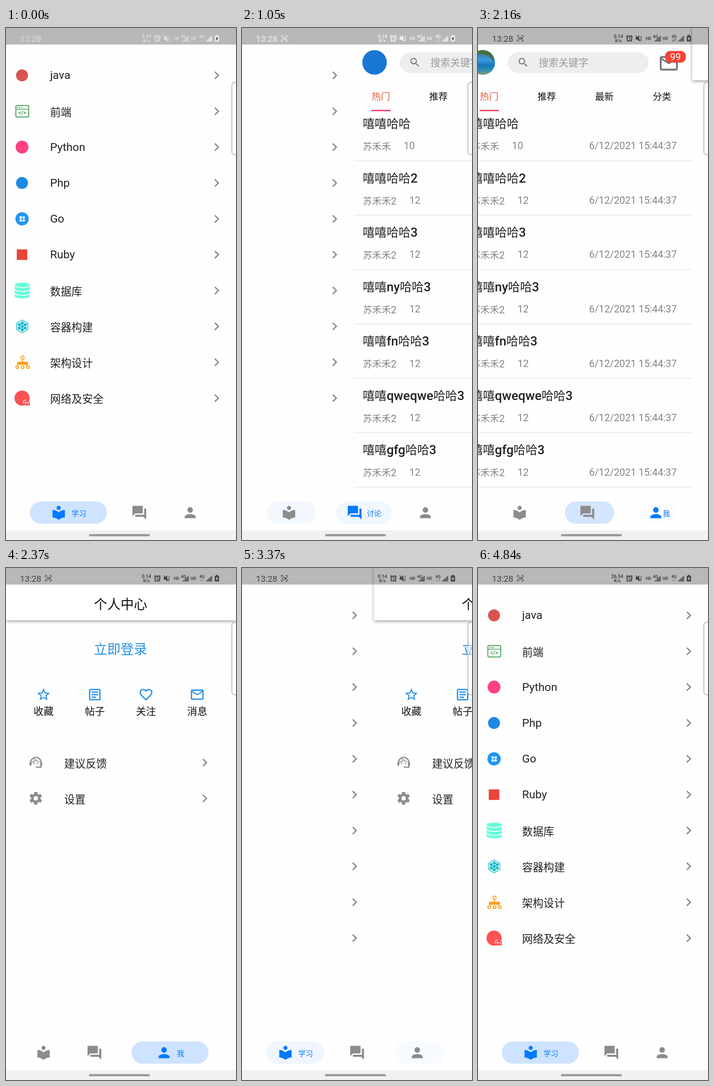
An HTML page with a canvas that plays this animation: 502 by 1116 pixels, repeating every 4.89 s.

```html
<!DOCTYPE html>
<html lang="zh-CN">
<head>
<meta charset="utf-8">
<style>
html, body { margin: 0; width: 100%; height: 100%; overflow: hidden; background: #fefefe; }
canvas { display: block; }
</style>
</head>
<body>
<canvas id="stage" width="502" height="1116"></canvas>
<script>
const W = 502, H = 1116, LOOP = 4890, SLIDE = 220;
const ctx = document.getElementById('stage').getContext('2d');
const GRAY = '#8c8c8c', BLUE = '#007aff', SKY = '#2590e6';
const LATIN = 'Roboto, "Noto Sans CJK SC", sans-serif';
const CJK = '"Noto Sans CJK SC", "Noto Sans CJK", sans-serif';

const icons = Object.fromEntries(Object.entries({
  chevron: 'M10 6L8.59 7.41 13.17 12l-4.58 4.59L10 18l6-6z',
  book: 'M12 11.55C9.64 9.35 6.48 8 3 8v11c3.48 0 6.64 1.35 9 3.55 2.36-2.19 5.52-3.55 9-3.55V8c-3.48 0-6.64 1.35-9 3.55zM12 8c1.66 0 3-1.34 3-3s-1.34-3-3-3-3 1.34-3 3 1.34 3 3 3z',
  chat: 'M21 6h-2v9H6v2c0 .55.45 1 1 1h11l4 4V7c0-.55-.45-1-1-1zm-4 6V3c0-.55-.45-1-1-1H3c-.55 0-1 .45-1 1v14l4-4h10c.55 0 1-.45 1-1z',
  person: 'M12 12c2.21 0 4-1.79 4-4s-1.79-4-4-4-4 1.79-4 4 1.79 4 4 4zm0 2c-2.67 0-8 1.34-8 4v2h16v-2c0-2.66-5.33-4-8-4z',
  search: 'M15.5 14h-.79l-.28-.27C15.41 12.59 16 11.11 16 9.5 16 5.91 13.09 3 9.5 3S3 5.91 3 9.5 5.91 16 9.5 16c1.61 0 3.09-.59 4.23-1.57l.27.28v.79l5 4.99L20.49 19l-4.99-5zm-6 0C7.01 14 5 11.99 5 9.5S7.01 5 9.5 5 14 7.01 14 9.5 11.99 14 9.5 14z',
  mail: 'M20 4H4c-1.1 0-1.99.9-1.99 2L2 18c0 1.1.9 2 2 2h16c1.1 0 2-.9 2-2V6c0-1.1-.9-2-2-2zm0 14H4V8l8 5 8-5v10zm-8-7L4 6h16l-8 5z',
  star: 'M22 9.24l-7.19-.62L12 2 9.19 8.63 2 9.24l5.46 4.73L5.82 21 12 17.27 18.18 21l-1.63-7.03L22 9.24zM12 15.4l-3.76 2.27 1-4.28-3.32-2.88 4.38-.38L12 6.1l1.71 4.04 4.38.38-3.32 2.88 1 4.28L12 15.4z',
  article: 'M19 5v14H5V5h14m0-2H5c-1.1 0-2 .9-2 2v14c0 1.1.9 2 2 2h14c1.1 0 2-.9 2-2V5c0-1.1-.9-2-2-2zM14 17H7v-2h7v2zm3-4H7v-2h10v2zm0-4H7V7h10v2z',
  heart: 'M16.5 3c-1.74 0-3.41.81-4.5 2.09C10.91 3.81 9.24 3 7.5 3 4.42 3 2 5.42 2 8.5c0 3.78 3.4 6.86 8.55 11.54L12 21.35l1.45-1.32C18.6 15.36 22 12.28 22 8.5 22 5.42 19.58 3 16.5 3zm-4.4 15.55l-.1.1-.1-.1C7.14 14.24 4 11.39 4 8.5 4 6.5 5.5 5 7.5 5c1.54 0 3.04.99 3.57 2.36h1.87C13.46 5.99 14.96 5 16.5 5c2 0 3.5 1.5 3.5 3.5 0 2.89-3.14 5.74-7.9 10.05z'
}).map(([name, d]) => [name, new Path2D(d)]));

// Moments at which another tab is chosen; dir is the side the new page enters from.
const switches = [
  { at: 985, from: 0, to: 1, dir: 1 },
  { at: 2143, from: 1, to: 2, dir: 1 },
  { at: 3298, from: 2, to: 0, dir: -1 }
];

const clamp = v => Math.max(0, Math.min(1, v));

function ease(x) {
  const bez = (s, a, b) => 3 * s * (1 - s) ** 2 * a + 3 * s * s * (1 - s) * b + s ** 3;
  let lo = 0, hi = 1;
  for (let i = 0; i < 20; i++) {
    const mid = (lo + hi) / 2;
    if (bez(mid, .25, .25) < x) lo = mid; else hi = mid;
  }
  return x >= 1 ? 1 : bez(lo, .1, 1);
}

function icon(name, x, y, size, color) {
  const k = size / 24;
  ctx.save();
  ctx.translate(x - size / 2, y - size / 2);
  ctx.scale(k, k);
  ctx.fillStyle = color;
  ctx.fill(icons[name]);
  ctx.restore();
}

// Chinese runs are set a little smaller than Latin ones.
function text(str, x, y, size, color, { weight = 400, center = false } = {}) {
  const runs = str.match(/[\u4e00-\u9fff]+|[^\u4e00-\u9fff]+/g).map(s => {
    const han = s.charCodeAt(0) > 0x4dff;
    const font = han ? `400 ${size * .945}px ${CJK}` : `${weight} ${size}px ${LATIN}`;
    ctx.font = font;
    return { s, font, w: ctx.measureText(s).width };
  });
  const width = runs.reduce((sum, r) => sum + r.w, 0);
  if (center) x -= width / 2;
  ctx.fillStyle = color;
  for (const r of runs) {
    ctx.font = r.font;
    ctx.fillText(r.s, x, y);
    x += r.w;
  }
  return width;
}

function rect(x, y, w, h, color, r = 0) {
  ctx.fillStyle = color;
  ctx.beginPath();
  ctx.roundRect(x, y, w, h, r);
  ctx.fill();
}

function disc(x, y, r, color) {
  ctx.fillStyle = color;
  ctx.beginPath();
  ctx.arc(x, y, r, 0, 7);
  ctx.fill();
}

function stroke(d, color, width) {
  ctx.strokeStyle = color;
  ctx.lineWidth = width;
  ctx.stroke(new Path2D(d));
}

function ring(x, y, r, color, width) {
  ctx.strokeStyle = color;
  ctx.lineWidth = width;
  ctx.beginPath();
  ctx.arc(x, y, r, 0, 7);
  ctx.stroke();
}

function hexagon(x, y, r) {
  ctx.beginPath();
  for (let i = 0; i < 6; i++) {
    const a = (i + .5) * Math.PI / 3;
    ctx.lineTo(x + r * Math.cos(a), y + r * Math.sin(a));
  }
  ctx.closePath();
}

// Each subject icon is drawn around the origin.
const subjects = [
  ['java', () => disc(0, 0, 13, '#d9534f')],
  ['前端', () => {
    const green = '#43a057';
    ctx.strokeStyle = green;
    ctx.lineWidth = 2;
    ctx.beginPath();
    ctx.roundRect(-13.5, -12.5, 28, 25, 3);
    ctx.stroke();
    stroke('M-13.5 -4.5H14.5', green, 1.5);
    for (const x of [-9, -5, -1]) disc(x, -8.3, 1.2, green);
    text('</>', .5, 8, 12, green, { weight: 700, center: true });
  }],
  ['Python', () => disc(0, 0, 14, '#ff4081')],
  ['Php', () => disc(0, 0, 13, '#1e88e5')],
  ['Go', () => {
    disc(0, 0, 14.5, '#2196f3');
    for (const [x, y] of [[-5.5, -5.5], [1, -5.5], [-5.5, 1]]) rect(x, y, 5, 5, '#fff', 1);
    stroke('M3.5 .5V6.5M.5 3.5H6.5', '#fff', 2.6);
  }],
  ['Ruby', () => rect(-11.5, -11.5, 23, 23, '#e8443a')],
  ['数据库', () => {
    rect(-16, -17, 33, 34, '#64ffda', { x: 16.5, y: 4.5 });
    for (const y of [-10, -1.5, 7]) stroke(`M-17 ${y}Q.5 ${y + 8} 18 ${y}`, '#fff', 2);
  }],
  ['容器构建', () => {
    const cyan = '#17bccb';
    ctx.strokeStyle = cyan;
    ctx.lineWidth = 1.6;
    hexagon(.5, 0, 14);
    ctx.stroke();
    ctx.fillStyle = cyan;
    for (let i = 0; i < 7; i++) {
      const a = (i + .5) * Math.PI / 3, r = i < 6 ? 7.4 : 0;
      hexagon(.5 + r * Math.cos(a), r * Math.sin(a), 3.8);
      ctx.fill();
    }
  }],
  ['架构设计', () => {
    const orange = '#ff9f1a';
    ring(1, -10, 3.6, orange, 2);
    stroke('M1 -6V0M-9 2V8M11 2V8', orange, 2);
    rect(-11, -1, 24, 6.5, orange, 1);
    for (const x of [-10.5, 1, 12.5]) ring(x, 10.8, 3, orange, 2);
  }],
  ['网络及安全', () => {
    disc(0, 0, 16.5, '#ff5252');
    rect(6, 7, 11, 9, '#ff5252');
    stroke('M3 12V7Q6 4 9 4M8 8V13M5 10H12M13 8L15 13', '#fff', 1.3);
  }]
];

function studyPage() {
  subjects.forEach(([name, draw], i) => {
    const y = 103.3 + 78.15 * i;
    ctx.save();
    ctx.translate(35, y);
    draw();
    ctx.restore();
    text(name, 96.2, y + (name < '\u4e00' ? 8 : 10.8), 24.7, '#222');
    icon('chevron', 459.8, y, 35, GRAY);
  });
}

function avatar(loaded) {
  disc(45, 75, 26.7, '#1976d2');
  if (!loaded) return;
  ctx.save();
  ctx.beginPath();
  ctx.arc(45, 75, 26.7, 0, 7);
  ctx.clip();
  const g = ctx.createLinearGradient(0, 48, 0, 102);
  [[0, '#34698c'], [.4, '#3c9be0'], [.6, '#1777bd'], [.82, '#2f8fae'], [1, '#8f9a78']]
    .forEach(([at, c]) => g.addColorStop(at, c));
  rect(18, 48, 54, 54, g);
  ctx.fillStyle = '#47703a';
  ctx.fill(new Path2D('M18 48H66Q55 51 58 62Q45 53 18 58ZM56 50Q70 58 68 76Q62 62 52 56Z'));
  ctx.restore();
}

const posts = ['', '2', '3', 'ny3', 'fn3', 'qweqwe3', 'gfg3'].map(tag => {
  const [, mid, num] = tag.match(/^([a-z]*)(\d*)$/);
  return `嘻嘻${mid}哈哈${num}`;
});

function discussPage(t) {
  avatar(t > 1520);
  rect(100, 53, 307, 45, '#eee', 22.5);
  icon('search', 133, 75, 26, '#777');
  text('搜索关键字', 167, 83, 22.9, '#9a9a9a');
  icon('mail', 451, 77, 47, '#757575');
  rect(443, 50, 45, 25.5, '#f44336', 11);
  text('99', 465.5, 69.5, 21, '#fff', { center: true });
  ['热门', '推荐', '最新', '分类'].forEach((tab, i) =>
    text(tab, 58.7 + 125.8 * i, 156.5, 21.5, i ? '#111' : '#ea5c38', { center: true }));
  rect(38, 178.5, 42, 2.7, '#e8305f');
  posts.forEach((title, i) => {
    const y = 118.55 * i;
    text(title, 19.2, y + 218, 27.6, '#222', { weight: 500 });
    const w = text(i ? '苏禾禾2' : '苏禾禾', 19.5, y + 266, 21.6, '#858585');
    text(i ? '12' : '10', 19.5 + w + 28, y + 264.3, 21.6, '#858585');
    text('6/12/2021 15:44:37', 277, y + 264.3, 21.6, '#858585');
    rect(0, y + 289, W, 1, '#d8d8d8');
  });
}

function gear(x, y) {
  ctx.save();
  ctx.translate(x, y);
  disc(0, 0, 10.3, GRAY);
  for (let i = 0; i < 6; i++) {
    rect(-3.7, -13.8, 7.4, 8, GRAY, 1);
    ctx.rotate(Math.PI / 3);
  }
  disc(0, 0, 4.9, '#fefefe');
  ctx.restore();
}

function agent(x, y) {
  ctx.save();
  ctx.translate(x, y);
  stroke('M-11 0A11 11 0 0 1 11.5 0V10H0', GRAY, 2.7);
  rect(-13.7, -2, 4.5, 9, GRAY, 2);
  rect(9.5, -2, 4.5, 9, GRAY, 2);
  stroke('M-8 -1Q-1 -2 -2 -7Q2 -2 8 -2', GRAY, 2);
  disc(-4, 2, 1.5, GRAY);
  disc(4, 2, 1.5, GRAY);
  ctx.restore();
}

function mePage() {
  ctx.save();
  ctx.shadowColor = 'rgba(0,0,0,.42)';
  ctx.shadowBlur = 7;
  ctx.shadowOffsetY = 2;
  rect(0, 0, W, 114, '#fff');
  ctx.restore();
  text('个人中心', 250, 89.5, 30.8, '#111', { center: true });
  text('立即登录', 250, 187.5, 30.8, SKY, { center: true });
  [['star', '收藏'], ['article', '帖子'], ['heart', '关注'], ['mail', '消息']].forEach(([name, label], i) => {
    const x = 82 + 111.8 * i;
    icon(name, x, 276, 33.5, SKY);
    text(label, x, 319.8, 23.2, '#111', { center: true });
  });
  agent(65, 424);
  gear(65, 502);
  ['建议反馈', '设置'].forEach((label, i) => {
    text(label, 127, 434.5 + 78 * i, 24.7, '#222');
    icon('chevron', 433.8, 424.3 + 78 * i, 35, GRAY);
  });
}

const pages = [studyPage, discussPage, mePage];

function drawPage(i, x, t) {
  ctx.save();
  ctx.translate(x, 0);
  rect(0, 0, W, H, '#fefefe');
  pages[i](t);
  ctx.restore();
}

function navBar(from, to, p, y) {
  const tabs = [['book', '学习'], ['chat', '讨论'], ['person', '我']];
  const widths = tabs.map((_, i) => {
    if (i === to) return 70 + 98 * y;
    if (i === from) return 108 - 38 * clamp((y - .57) / .43);
    return 70;
  });
  const spare = 308 - widths.reduce((a, b) => a + b);
  let x = 52 + spare / 6;
  tabs.forEach(([name, label], i) => {
    const w = widths[i], on = i === to;
    const alpha = on ? p : i === from ? clamp(1 - 1.5 * y) : 0;
    rect(x, 1032, w, 48.5, `rgba(206,227,255,${alpha})`, 24.25);
    const gap = on ? 13 * clamp(4 * p - .33) : 10;
    const tail = on ? gap + 16 * label.length - 3 : gap;
    const cx = x + w / 2 - tail / 2;
    icon(name, cx, 1056.5, 36, on ? BLUE : GRAY);
    if (on) text(label, cx + 15 + gap, 1063.5, 17, BLUE);
    x += w + 41 + spare / 3;
  });
}

function bars(x, color) {
  for (let i = 0; i < 5; i++) rect(x + 2.7 * i, 27 - 2.4 * i, 1.9, 2.4 + 2.4 * i, color);
}

function statusBar(t) {
  rect(0, 0, W, 36, 'rgba(0,0,0,.28)');
  const dark = t > 1100;
  const c = dark ? '#454545' : '#f4f4f4';
  const small = (s, x, y, size = 9.5) => text(s, x, y, size, c, { weight: 700, center: true });
  ctx.save();
  if (!dark) ctx.globalAlpha = .6 + .3 * clamp(t / 300);
  text('13:28', 30.5, 29.5, 18.7, c);
  if (t > 60) {
    stroke('M86 20V16.5H89.5M95 16.5H98.5V20M98.5 25V28.5H95M89.5 28.5H86V25', c, 1.3);
    ring(91.5, 22.5, 2.7, c, 1.3);
    rect(95, 20.5, 2.5, 4, c);
  }
  const fast = t > 4000;
  small(fast ? '26.54' : '0.14', fast ? 304 : 306.5, 21.5, 10);
  small('K/s', fast ? 304 : 306.5, 30.5, 9.5);
  ring(330.5, 23, 5.3, c, 2.2);
  stroke('M330.5 19.5V23.5L333.5 25M323.5 19L327 16M337.5 19L334 16M326.5 27L325 29.5M334.5 27L336 29.5', c, 1.8);
  ctx.fillStyle = c;
  ctx.fill(new Path2D('M344 20H347L352 16V29L347 25H344Z'));
  stroke('M344 16L355 29', c, 1.5);
  stroke('M355 17Q357.5 19 355.5 21.5Q354 24 357.5 27', c, 1.3);
  small('HD', 372, 25.5, 9);
  small('4G', 387.5, 21.5, 9);
  bars(386, c);
  small('HD', 409, 25.5, 9);
  small('4G', 428, 21.5, 9);
  ctx.globalAlpha *= t > 1700 && t < 2250 ? 1 : .45;
  stroke('M426 24V29M424.5 27.5L426 29.5L427.5 27.5M430.5 29.5V24.5M429 26L430.5 24L432 26', c, 1);
  ctx.globalAlpha = 1;
  bars(437, c);
  const cell = dark ? c : '#e8e8e8';
  rect(455.5, 17, 9.5, 12.5, cell, 1.5);
  rect(458, 15, 4.5, 2.5, cell);
  ctx.fillStyle = dark ? '#ddd' : '#222';
  ctx.fill(new Path2D('M461.5 18.5L457.5 24H460L459 28L463 22.5H460.5Z'));
  ctx.restore();
}

function overlays() {
  rect(0, 1095, W, 21, '#f1f1f1');
  rect(181, 1103, 133, 5, '#9c9c9c', 2.5);
  ctx.beginPath();
  ctx.roundRect(493, 118.5, 30, 158, 6);
  ctx.fillStyle = 'rgba(255,255,255,.5)';
  ctx.fill();
  ctx.strokeStyle = '#a8a8a8';
  ctx.lineWidth = 1.4;
  ctx.stroke();
}

function render(t) {
  const move = switches.filter(s => t >= s.at).pop() || { at: -SLIDE, from: 2, to: 0, dir: -1 };
  const p = clamp((t - move.at) / SLIDE), y = ease(p);
  rect(0, 0, W, H, '#fefefe');
  if (p < 1) {
    const fromX = -move.dir * W * y, toX = fromX + move.dir * W;
    // The later page lies on top so that its bar casts a shadow on its neighbour.
    const order = [[move.from, fromX], [move.to, toX]].sort((a, b) => a[0] - b[0]);
    for (const [i, x] of order) drawPage(i, x, t);
  } else {
    drawPage(move.to, 0, t);
  }
  navBar(move.from, move.to, p, y);
  statusBar(t);
  overlays();
}

const start = performance.now();
function tick() {
  render((performance.now() - start) % LOOP);
  requestAnimationFrame(tick);
}
tick();
</script>
</body>
</html>
```
